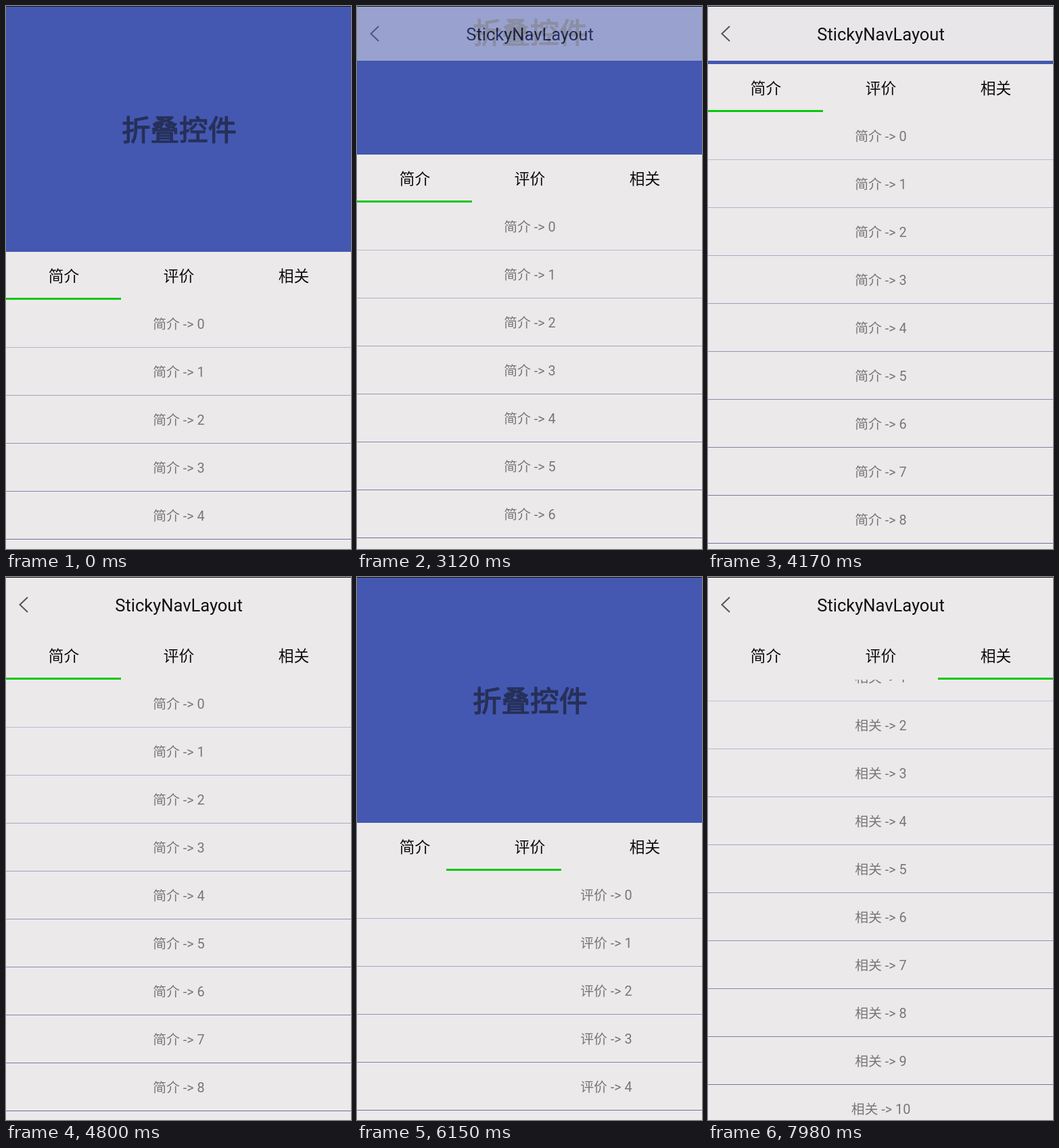
Animation of 510x804 px, one loop 8000 ms. Source, as an HTML page with a canvas:

```html
<!DOCTYPE html>
<html lang="zh-CN">
<head>
<meta charset="utf-8">
<title>StickyNavLayout</title>
<style>
  html, body { margin: 0; width: 100%; height: 100%; overflow: hidden; background: #ece9eb; }
  canvas { display: block; width: 510px; height: 804px; }
</style>
</head>
<body>
<canvas id="stage" width="510" height="804"></canvas>
<script>
const W = 510, H = 804, LOOP = 8000, TICK = 30;
const HEADER = 364, BAR = 81, TAB = 71, ROW = 71;
const COLLAPSE = HEADER - BAR;
const PAPER = '#ece9eb', INDIGO = '#4458b1', GREEN = '#06c80c';
const FONT = 'Roboto, "Noto Sans CJK SC", "Noto Sans CJK", "Noto Sans CJK JP", sans-serif';
const TABS = ['简介', '评价', '相关'];

const canvas = document.getElementById('stage');
const ctx = canvas.getContext('2d');

// Ease-out from 0 to 1 between two times; a higher power brakes harder.
function glide(t, from, to, power) {
  const u = Math.min(1, Math.max(0, (t - from) / (to - from)));
  return 1 - (1 - u) ** power;
}

// The header collapses first, any excess scrolls the list.
function scrollAt(t) {
  const folded = glide(t, 2310, 2490, 8.7) - glide(t, 3060, 3270, 2)
    + glide(t, 3630, 4440, 3.75) - glide(t, 4800, 5520, 1.08);
  const excess = 1.55 * ROW;
  return Math.round(folded * COLLAPSE + glide(t, 7410, 7680, 2) * (COLLAPSE + excess));
}

function pageAt(t) {
  return glide(t, 5880, 6390, 2) + glide(t, 6450, 7290, 3.83);
}

function rect(g, color, x, y, w, h) {
  g.fillStyle = color;
  g.fillRect(x, y, w, h);
}

function label(g, text, x, y, size, color, outline = 0) {
  g.font = `${size}px ${FONT}`;
  g.textAlign = 'center';
  g.fillStyle = g.strokeStyle = color;
  g.fillText(text, x, y);
  if (outline) {
    g.lineWidth = outline;
    g.lineJoin = 'round';
    g.strokeText(text, x, y);
  }
}

// The toolbar is rendered apart so that it can fade as one layer.
function makeToolbar() {
  const layer = document.createElement('canvas');
  layer.width = W;
  layer.height = BAR;
  const g = layer.getContext('2d');
  rect(g, PAPER, 0, 0, W, BAR);
  g.strokeStyle = '#555';
  g.lineWidth = 2;
  g.beginPath();
  g.moveTo(32, 30);
  g.lineTo(20.5, 41);
  g.lineTo(32, 52);
  g.stroke();
  label(g, 'StickyNavLayout', 255.5, 51, 25.5, '#111');
  return layer;
}
const toolbar = makeToolbar();

function drawList(top, offset, page) {
  ctx.save();
  ctx.beginPath();
  ctx.rect(0, top, W, H - top);
  ctx.clip();
  const first = Math.floor(offset / ROW);
  for (let row = first; top + row * ROW - offset < H; row++) {
    const y = top + row * ROW - offset;
    const strength = 0.25 + 0.6 * (y + ROW - top) / (H - top);
    rect(ctx, `rgba(85, 90, 140, ${strength})`, 0, y + 70, W, 1);
    TABS.forEach((name, i) => {
      const dx = Math.round((i - page) * W);
      if (Math.abs(dx) < W) label(ctx, `${name} -> ${row}`, 255.5 + dx, y + 43, 19.83, '#777');
    });
  }
  ctx.restore();
}

function draw(t) {
  const scroll = scrollAt(t);
  const page = pageAt(t);
  const fold = Math.min(scroll, COLLAPSE);
  const navTop = HEADER - fold;

  rect(ctx, PAPER, 0, 0, W, H);
  rect(ctx, INDIGO, 0, 0, W, navTop);
  label(ctx, '折叠控件', 256, 199 - fold, 42.5, '#263059', 1.4);

  drawList(navTop + TAB, scroll - fold, page);
  TABS.forEach((name, i) => label(ctx, name, 85.4 + i * 170, navTop + 44, 22.67, '#0c0c0c'));
  rect(ctx, GREEN, Math.round(page * 170), navTop + 68, 170, 3);

  ctx.globalAlpha = fold / COLLAPSE;
  ctx.drawImage(toolbar, 0, 0);
  ctx.globalAlpha = 1;
  rect(ctx, '#111', 0, 0, W, 1);
}

const start = performance.now();
function frame() {
  const t = (performance.now() - start) % LOOP;
  draw(Math.floor(t / TICK) * TICK);
  requestAnimationFrame(frame);
}
frame();
</script>
</body>
</html>
```
